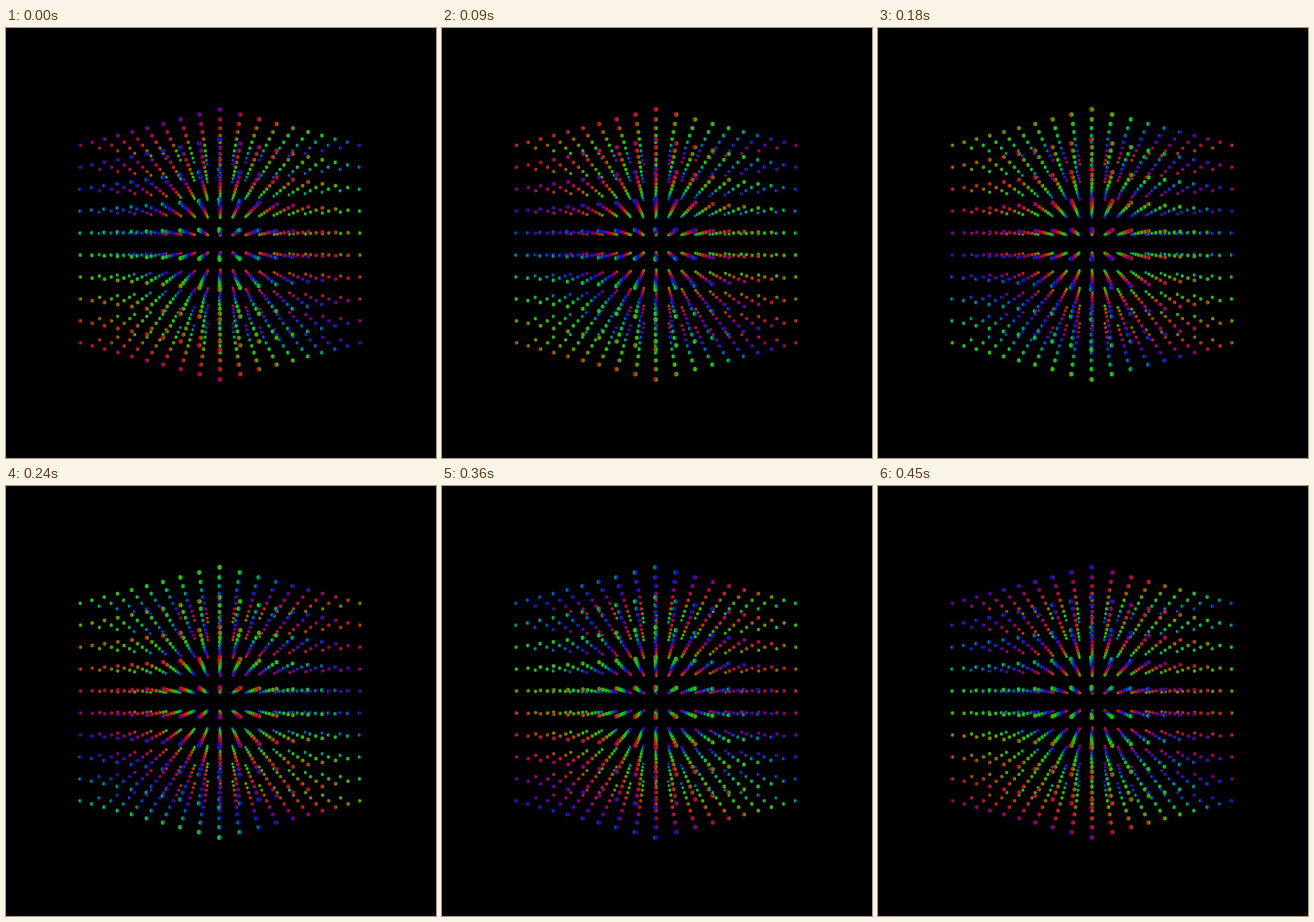
Write an HTML page with a canvas that moves like this. It is 748 px wide and 748 px high and loops after 480 ms.

```html
<!DOCTYPE html>
<html lang="en">
<head>
<meta charset="utf-8">
<title>Sphere lattice</title>
<style>
  html, body { margin: 0; width: 100%; height: 100%; overflow: hidden; background: #000; }
  canvas { display: block; width: 748px; height: 748px; }
</style>
</head>
<body>
<canvas id="stage" width="748" height="748"></canvas>
<script>
const ctx = document.getElementById('stage').getContext('2d');
const TAU = Math.PI * 2;
const SIZE = 748, N = 10, STEPS = 16, STEP_MS = 30;
const FOCAL = 902.8, CAMERA = 23.65, RADIUS = 0.082, SHIFT = 0.048;
const STOPS = 10, GLOW = 232;

// Lattice turned 45 degrees about the vertical axis, seen in perspective.
const balls = [];
for (let i = 0; i < N; i++) {
  for (let k = 0; k < N; k++) {
    const x = (i - k) * Math.SQRT1_2 - SHIFT;
    const depth = CAMERA + (i + k - N + 1) * Math.SQRT1_2;
    const scale = FOCAL / depth;
    for (let j = 0; j < N; j++) {
      balls.push({
        x: SIZE / 2 + x * scale,
        y: SIZE / 2 + (j - (N - 1) / 2 + SHIFT) * scale,
        r: RADIUS * scale,
        depth,
        phase: 0.8 + (i - j) / N - Math.atan2(x, depth) / TAU
      });
    }
  }
}
balls.sort((a, b) => b.depth - a.depth);

// Red, green and blue sit a third of a turn apart and blend linearly.
function channel(phase, center) {
  const d = phase - center;
  return Math.round(GLOW * Math.max(0, 1 - 3 * Math.abs(d - Math.round(d))));
}

function color(phase) {
  return `rgb(${channel(phase, 0)},${channel(phase, 1 / 3)},${channel(phase, 2 / 3)})`;
}

function drawBall(ball, turn) {
  const { x, y, r } = ball;
  const fill = ctx.createLinearGradient(x - r, 0, x + r, 0);
  for (let s = 0; s <= STOPS; s++) {
    const angle = (s / STOPS - 0.5) * Math.PI;
    fill.addColorStop((1 + Math.sin(angle)) / 2, color(ball.phase + turn + angle / TAU));
  }
  ctx.fillStyle = fill;
  ctx.beginPath();
  ctx.arc(x, y, r, 0, TAU);
  ctx.fill();
}

let shown = -1;
function render(ms) {
  const step = Math.floor(ms / STEP_MS) % STEPS;
  if (step === shown) return;
  shown = step;
  ctx.fillStyle = '#000';
  ctx.fillRect(0, 0, SIZE, SIZE);
  for (const ball of balls) drawBall(ball, step / STEPS);
}

const start = performance.now();
function tick() {
  render(performance.now() - start);
  requestAnimationFrame(tick);
}
render(0);
requestAnimationFrame(tick);
</script>
</body>
</html>
```
